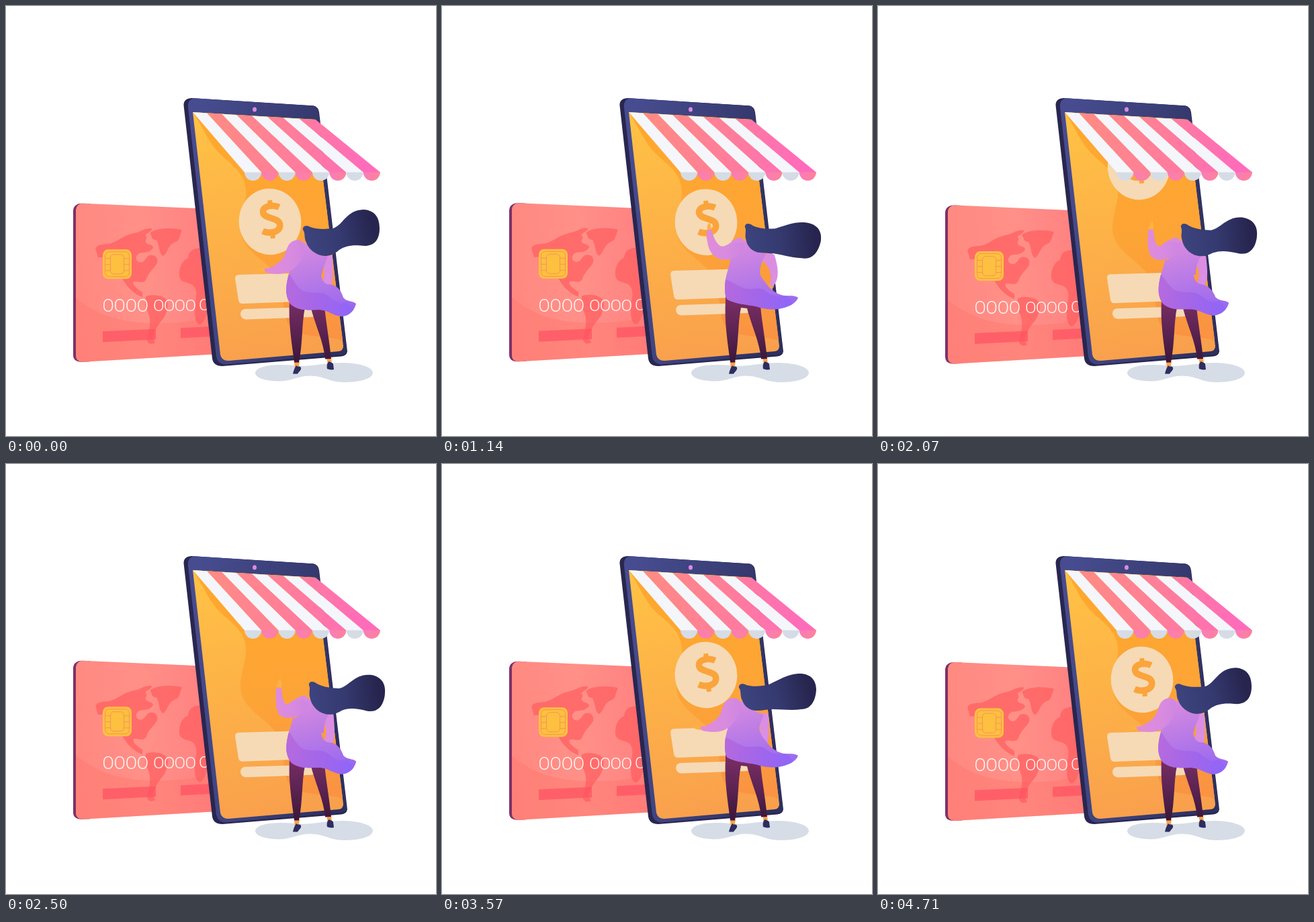
Recreate the animation shown at these times as an HTML page with a canvas. Size 640 by 640 pixels, loop 4780 ms.

```html
<!DOCTYPE html>
<html lang="en">
<head>
<meta charset="utf-8">
<title>Mobile shop</title>
<style>
html, body { margin: 0; width: 100%; height: 100%; overflow: hidden; background: #fff; }
canvas { display: block; width: 100vw; height: 100vh; }
</style>
</head>
<body>
<canvas id="stage" width="640" height="640"></canvas>
<script>
const ctx = document.getElementById('stage').getContext('2d');
const LOOP = 4780, STEP = 1000 / 14, TAU = Math.PI * 2;

const lerp = (a, b, k) => a + (b - a) * k;
const ramp = (t, from, to) => Math.min(1, Math.max(0, (t - from) / (to - from)));
const ease = (t, from, to) => { const u = ramp(t, from, to); return u * u * (3 - 2 * u); };

// Blends two path strings that share the same commands.
function morph(a, b, k) {
  const ends = b.match(/-?[\d.]+/g);
  let i = 0;
  return a.replace(/-?[\d.]+/g, n => lerp(+n, +ends[i++], k).toFixed(2));
}

function gradient(x0, y0, x1, y1, ...colors) {
  const g = ctx.createLinearGradient(x0, y0, x1, y1);
  colors.forEach((c, i) => g.addColorStop(i / (colors.length - 1), c));
  return g;
}

function fill(d, paint) {
  ctx.fillStyle = paint;
  ctx.fill(new Path2D(d));
}

function ellipse(x, y, rx, ry, paint, angle = 0) {
  ctx.fillStyle = paint;
  ctx.beginPath();
  ctx.ellipse(x, y, rx, ry, angle, 0, TAU);
  ctx.fill();
}

function group(draw) {
  ctx.save();
  draw();
  ctx.restore();
}

const SCREEN = 'M278 158 L461 169 L502 506 Q502 513 495 514 L331 528 Q321 528 319 519Z';
const CARD = 'M115 293.5 L320 302.5 L320 517.5 L114 529.5 Q104 529 104 520 L104 303 Q105 293.5 115 293.5Z';
const SKIN = '#f9a24a', CREAM = '#f6dab5';

const ARM = {
  down: 'M424 352 C416 358 418 371 409 379 C402 385 394 391 385 391 C384 393 386 396 388 397 C402 400 418 400 428 391 C437 383 446 372 443 356 C440 346 431 347 424 352Z',
  tap: 'M430 352 C424 356 419 359 414 357 C408 353 404 344 401 333 C399 332 395 333 394 335 C394 348 395 362 404 371 C412 378 422 379 431 376 C442 373 452 368 450 353 C446 343 436 346 430 352Z',
  up: 'M430 350 C424 354 420 359 416 357 C412 352 411 344 410 334 C408 332 403 332 402 334 C401 348 401 364 406 372 C412 379 422 379 431 376 C442 373 452 368 450 353 C446 343 436 346 430 350Z'
};
const HAND = {
  down: 'M387 391 C381 392 378 388 372 390 C373 393 380 396 387 396Z',
  tap: 'M401 334 C401 329 400 326 398 322 C395 325 394 330 395 335Z',
  up: 'M409 334 C411 328 411 324 408 319 C405 322 403 328 403 334Z'
};
const DRESS = [
  'M427 378 C424 392 417 405 417 425 C418 435 421 441 425 445 C438 455 452 452 467 452 C480 453 487 461 500 462 C512 461 519 452 521 443 C515 438 508 441 502 434 C498 420 490 414 478 414 C472 412 468 404 469 395 L470 378Z',
  'M430 374 C428 390 421 400 421 420 C421 428 422 434 425 437 C438 444 452 444 467 447 C480 451 487 452 500 451 C514 449 527 443 530 434 C522 429 514 433 505 430 C495 427 487 420 481 411 C474 403 471 396 473 388 L474 374Z'
];
const FOLD = [
  'M410 390 C424 392 428 420 445 425 C460 429 470 424 480 432 C492 442 500 444 508 440 L530 470 L410 470Z',
  'M410 405 C424 402 440 420 455 421 C468 422 475 417 485 427 C495 433 505 431 515 432 L540 470 L410 470Z'
];
const BODICE = [
  'M424 352 C432 347 437 349 444 350 C455 362 466 369 479 373 C476 382 472 388 470 400 L426 400 C428 390 430 380 428 370Z',
  'M431 350 C438 345 442 344 450 345 C460 360 470 366 482 369 C477 378 473 386 473 400 L428 400 C432 390 434 380 432 370Z'
];
const BACK_ARM = [
  'M470 373 C476 370 484 370 486 374 C486 390 488 402 485 413 C482 419 474 418 471 411 C474 400 476 392 470 384Z',
  'M474 371 C482 367 492 367 495 371 C500 388 503 404 494 416 C490 420 488 416 489 412 C491 400 488 386 474 377Z'
];
const HAIR = [
  'M442 333 C441 327 448 326 453 329 C465 333 476 332 487 331 C502 326 506 304 532 303 C550 304 556 316 556 331 C556 348 548 357 534 357 C515 355 505 357 496 363 C488 370 482 372 474 372 C460 371 450 361 447 352 C443 345 446 338 442 333Z',
  'M442 333 C441 327 448 326 453 329 C463 332 476 331 487 328 C502 321 514 313 530 312 C549 311 557 322 557 336 C556 354 548 365 535 365 C520 367 507 365 492 365 C484 365 478 367 470 367 C459 368 450 361 447 352 C443 345 446 338 442 333Z'
];

function drawCard(dy) {
  group(() => {
    ctx.translate(0, dy);
    fill('M113 293.5 L125 294 L125 529 L112 529.5 Q100 529 100 519 L100 304 Q101 294 113 293.5Z', '#7f3069');
    fill(CARD, gradient(104, 400, 310, 380, '#ff8981', '#ff9088', '#ff8080'));
    ctx.clip(new Path2D(CARD));
    fill('M104 434 C140 464 180 472 225 472 C260 472 285 468 320 459 L320 540 L104 540Z', 'rgba(255,112,104,.35)');

    const land = 'rgba(255,92,94,.68)';
    fill('M134 364 C131 356 142 354 153 354 C165 351 175 341 190 338 C201 336 207 329 217 331 C218 336 206 338 208 342 C213 346 203 349 211 354 C216 355 219 357 219 360 C214 366 209 367 201 367 C193 369 191 378 198 381 C207 383 207 374 213 371 C221 369 227 374 225 382 C221 390 212 396 209 406 C206 414 198 409 190 410 C187 415 196 421 203 426 L203 433 C190 428 180 418 174 407 C166 398 171 383 165 374 C156 367 145 375 137 374Z', land);
    fill('M214 338 C222 330 245 329 262 333 C258 341 259 349 252 351 C240 356 242 366 234 372 C227 369 229 357 224 348 C215 348 218 341 214 338Z', land);
    fill('M208 432 C216 428 234 430 239 437 C243 444 240 456 234 465 C226 474 220 484 218 493 L222 501 C215 505 209 501 210 494 C215 478 216 465 211 455 C206 446 208 438 208 432Z', land);
    fill('M289 360 C275 361 272 367 271 375 C261 379 257 391 258 402 C261 414 273 409 280 417 C288 429 279 442 281 455 C281 464 283 474 289 474 C298 468 300 455 304 445 L320 430 L320 355Z', land);
    fill('M144 484 L223 480.5 L223 496 L144 500Z', 'rgba(255,82,98,.72)');
    fill('M260 479 L320 476 L320 491 L260 494Z', 'rgba(255,82,98,.72)');

    drawChip();
    drawDigits(143.5, 455, 25.5, -.2);
    drawDigits(219, 454, 24.5, -.8);
    drawDigits(287, 453, 24, -.8);
  });
}

// Round capitals give the wide zeros of embossed card numbers.
function drawDigits(x, y, size, spacing) {
  ctx.font = `300 ${size}px Roboto, "Open Sans", sans-serif`;
  ctx.letterSpacing = spacing + 'px';
  ctx.textAlign = 'left';
  ctx.textBaseline = 'alphabetic';
  ctx.fillStyle = '#fff8f6';
  ctx.fillText('OOOO', x, y);
  ctx.letterSpacing = '0px';
}

function drawChip() {
  ctx.fillStyle = '#fdc03f';
  ctx.beginPath();
  ctx.roundRect(144, 362, 43, 44, 8);
  ctx.fill();
  ctx.strokeStyle = '#f4945c';
  ctx.lineWidth = 1;
  ctx.beginPath();
  ctx.roundRect(147.5, 365.5, 36, 37, 6);
  ctx.roundRect(155.5, 369.5, 20, 29, 5);
  for (const y of [375.5, 384.5, 393.5]) {
    ctx.moveTo(147.5, y); ctx.lineTo(155.5, y);
    ctx.moveTo(175.5, y); ctx.lineTo(183.5, y);
  }
  ctx.stroke();
}

function drawPhone() {
  fill('M276 137 L458 148.5 Q465 150 466 158 L508 514 Q507 521 499 521.5 L322 536 Q309 536 307 525 L264.5 148 Q264 138 276 137Z', '#29264f');
  fill('M280 137.3 L458 148.5 Q464 150 465 158 L507 512 Q507 518 500 519 L327 533.5 Q315 533 313 522 L271 151 Q270 139 280 137.3Z',
    gradient(270, 300, 505, 330, '#474c90', '#3b4079', '#2d3060'));
  ellipse(370, 154, 3, 3.5, '#d98be0');
  fill(SCREEN, gradient(300, 170, 370, 525, '#ffc145', '#fdb147', '#f9a04d'));
  group(() => {
    ctx.clip(new Path2D(SCREEN));
    fill('M278 158 C299 190 302 207 327 228 C350 247 358 260 357 282 C354 306 345 325 351 344 C361 372 397 383 407 410 C417 436 408 467 428 482 C450 496 478 488 510 501 L510 150Z',
      gradient(390, 200, 440, 495, '#ffa72e', '#fda437', '#fa9342'));
  });
}

function drawPlaceholders(dy) {
  group(() => {
    ctx.translate(dy * .15, dy);
    fill('M346 400 L456 397 Q461 397 462 402 L466 434 Q466 438 461 439 L352 443 Q347 443 346 438 L341 406 Q341 400 346 400Z', CREAM);
    fill('M355 451 L453 448 Q460 448 461 455 Q461 462 454 463 L357 466.5 Q350 466 349 459 Q349 452 355 451Z', CREAM);
  });
}

function drawCoin(t) {
  let dx = 0, dy = 0, scale = 1, alpha = 1;
  if (t < 2360) {
    dy = 13 * ease(t, 1050, 1710) - 148 * ease(t, 1750, 2290);
    dx = dy < 0 ? dy * .06 : 0;
  } else {
    const rise = ease(t, 3140, 3570);
    dy = lerp(42, -7, rise) + 7 * ease(t, 3570, 3930);
    dx = lerp(8, 0, rise);
    scale = lerp(.81, 1, rise);
    alpha = ramp(t, 3165, 3500);
  }
  if (!alpha) return;
  group(() => {
    ctx.clip(new Path2D(SCREEN));
    ctx.globalAlpha = alpha;
    ctx.translate(393 + dx, 321 + dy);
    ctx.scale(scale, scale);
    ellipse(0, 0, 46.3, 49.3, CREAM, -.12);
    ctx.translate(2, -3.5);
    ctx.rotate(-.085);
    ctx.strokeStyle = '#fba43b';
    ctx.lineWidth = 9.5;
    ctx.stroke(new Path2D('M13 -17 C5 -21.5 -11.5 -22 -11.5 -11.5 C-11.5 -1 12 -2.5 12 9 C12 21 -5 21.5 -14.5 16.5'));
    ctx.lineWidth = 7;
    ctx.stroke(new Path2D('M0 -28.5 V-18 M0 18 V28.5'));
  });
}

function drawAwning() {
  const pink = gradient(300, 200, 540, 215, '#ff8b83', '#ff7e9a', '#ff6bbb');
  const topX = i => 278 + i * 21.2 + i * i * .21, topY = i => 158 + i * 1.4, lowX = i => 355 + i * 25.25;
  for (let i = 0; i < 8; i++) {
    const x = lowX(i), odd = i % 2;
    ctx.fillStyle = odd ? gradient(x, 247, x + 25, 250, '#f97cba', '#fd8398') : '#d5dce6';
    ctx.beginPath();
    ctx.ellipse(x + 12.6, 247, 12.6, 13, 0, 0, Math.PI);
    ctx.fill();
    fill(`M${topX(i)} ${topY(i)} L${topX(i + 1)} ${topY(i + 1)} L${lowX(i + 1)} 247.5 L${x} 247.5Z`, odd ? pink : '#f4f6fb');
  }
}

function drawLegs() {
  const cloth = gradient(0, 440, 0, 530, '#782d63', '#5b2352', '#3b1738');
  fill('M429 529 L437 529 L435 541 L430 541Z', SKIN);
  fill('M477 522 L484 522 L485 534 L479 534Z', SKIN);
  fill('M453 428 L474 428 L474 446 C476 470 481 495 484 525 L475 525.5 C473 500 460 475 453 446Z', cloth);
  fill('M422 425 L460 425 L454 450 L445 449 C440 472 442 500 436 530.5 L429 530.5 C425 500 420 470 422 438Z', cloth);
  fill('M427 547.5 C428 542 430 538 432 535 C434 538 437 535 439 538 C440 542 436 544 434 547.5Z', '#2d2d60');
  fill('M478 540 C477 535 478 531 481 529 C483 531 486 530 487 533 L488 541 C484 542 481 541 478 540Z', '#2d2d60');
}

function drawWoman(t, wave) {
  const lean = ease(t, 70, 590) - ease(t, 2600, 3140);
  const tap = ease(t, 700, 1100) - ease(t, 1180, 1650);
  const armPose = set => morph(morph(set.down, set.up, lean), set.tap, tap);
  const swing = lean * (.15 + .85 * wave);

  drawLegs();

  ellipse(lerp(479, 490, swing), lerp(411, 416, swing), 4, 5, SKIN);
  fill(morph(...BACK_ARM, swing), gradient(475, 370, 485, 420, '#dc8de0', '#d890e4'));

  const body = gradient(440, 350, 470, 460, '#d98bdf', '#b97be6', '#9a68ef');
  const dress = morph(...DRESS, wave);
  fill(morph(...BODICE, lean), body);
  fill(dress, body);
  group(() => {
    ctx.clip(new Path2D(dress));
    fill(morph(...FOLD, wave), gradient(420, 420, 522, 445, '#b56ade', '#a266ea', '#8d66fa'));
  });

  fill(armPose(HAND), '#fdb143');
  fill(armPose(ARM), gradient(395, 370, 445, 375, '#e08bdb', '#d98bdf', '#cf86e1'));

  group(() => {
    ctx.translate(472, 385);
    ctx.rotate(.162 * lean);
    ctx.translate(-472, -385);
    fill('M444 332 C444 337 440 338 442 342 C443 346 443 349 439 350 L446 354 L454 345Z', SKIN);
    fill(morph(...HAIR, wave), gradient(445, 350, 545, 325, '#3d447f', '#353a70', '#27254f'));
  });
}

function draw(time) {
  const step = Math.min(66, Math.floor((time % LOOP + 3) / STEP));
  const t = step * STEP;
  const phase = TAU * t / (LOOP / 2);
  const wave = (1 - Math.cos(phase + .09)) / 2;

  ctx.fillStyle = '#fff';
  ctx.fillRect(0, 0, 640, 640);
  drawCard(.3 - 3.7 * Math.sin(phase));
  drawPhone();
  fill('M371 546 C372 535 402 532 430 535 C454 538 470 531 502 531 C530 532 546 538 546 546 C545 556 523 560 505 560 C480 560 476 551 453 550.5 C435 550 425 559 404 558.5 C385 558 371 553 371 546Z', '#d6dde7');
  drawPlaceholders(-6 * wave);
  drawCoin(t);
  drawAwning();
  drawWoman(t, wave);
}

const start = performance.now();
function tick() {
  draw(performance.now() - start);
  requestAnimationFrame(tick);
}
tick();
</script>
</body>
</html>
```
